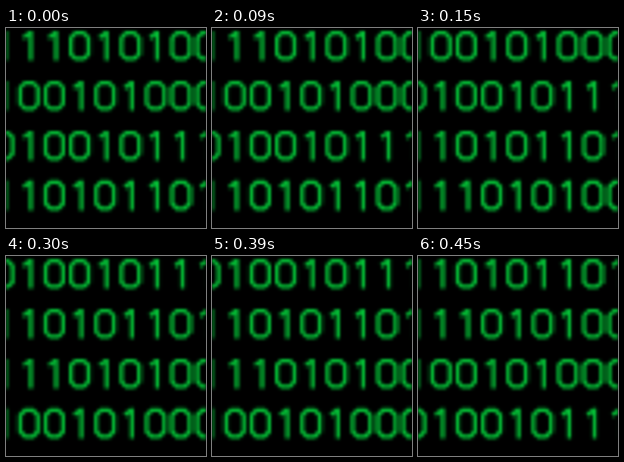
An HTML page with a canvas for the animation above (0.6 s loop, 200 px wide and 200 px high).

```html
<!DOCTYPE html>
<html lang="en">
<head>
<meta charset="utf-8">
<title>Binary rows</title>
<style>
html, body { margin: 0; width: 100%; height: 100%; overflow: hidden; background: #000; }
canvas { display: block; width: 200px; height: 200px; }
</style>
</head>
<body>
<canvas id="stage" width="200" height="200"></canvas>
<script>
const STEP = 150, SIZE = 200, GRID = 64;
const PITCH = 25.3, LEFT = -13.6, ROW = 49.8, TOP = 3.2;
const lines = ['111010100', '100101000', '010010111', '110101101'];

const ctx = document.getElementById('stage').getContext('2d');
const small = document.createElement('canvas');
small.width = small.height = GRID;
const pen = small.getContext('2d');

function path(points, closed) {
  pen.beginPath();
  for (const [x, y] of points) pen.lineTo(x, y);
  if (closed) pen.closePath();
  pen.stroke();
}

function zero(x, y) {
  const l = x + 2.2, r = x + 20.4, t = y + 1.9, b = y + 28, c = 5;
  path([[l + c, t], [r - c, t], [r, t + c], [r, b - c],
        [r - c, b], [l + c, b], [l, b - c], [l, t + c]], true);
}

function one(x, y) {
  const stem = x + 13.1;
  path([[stem - 7.6, y + 7], [stem - 1.2, y + 1.9], [stem, y + 1.9], [stem, y + 30]]);
}

// Coarse antialiased cells give the glyphs their uneven green shades.
function draw(step) {
  pen.setTransform(1, 0, 0, 1, 0, 0);
  pen.fillStyle = '#000';
  pen.fillRect(0, 0, GRID, GRID);
  pen.scale(GRID / SIZE, GRID / SIZE);
  pen.strokeStyle = '#04c838';
  pen.lineWidth = 3.9;
  for (let row = 0; row < lines.length; row++) {
    const bits = lines[(row + step) % lines.length];
    [...bits].forEach((bit, i) => {
      const glyph = bit === '0' ? zero : one;
      glyph(LEFT + i * PITCH, TOP + row * ROW);
    });
  }
  ctx.fillStyle = '#000';
  ctx.fillRect(0, 0, SIZE, SIZE);
  ctx.imageSmoothingEnabled = false;
  ctx.filter = 'blur(0.8px)';
  ctx.drawImage(small, 0, 0, SIZE, SIZE);
  ctx.filter = 'none';
}

let start = null, shown = 0;
function tick(now) {
  if (start === null) start = now;
  const step = Math.floor(Math.max(0, now - start) / STEP) % lines.length;
  if (step !== shown) draw(shown = step);
  requestAnimationFrame(tick);
}
draw(0);
requestAnimationFrame(tick);
</script>
</body>
</html>
```
